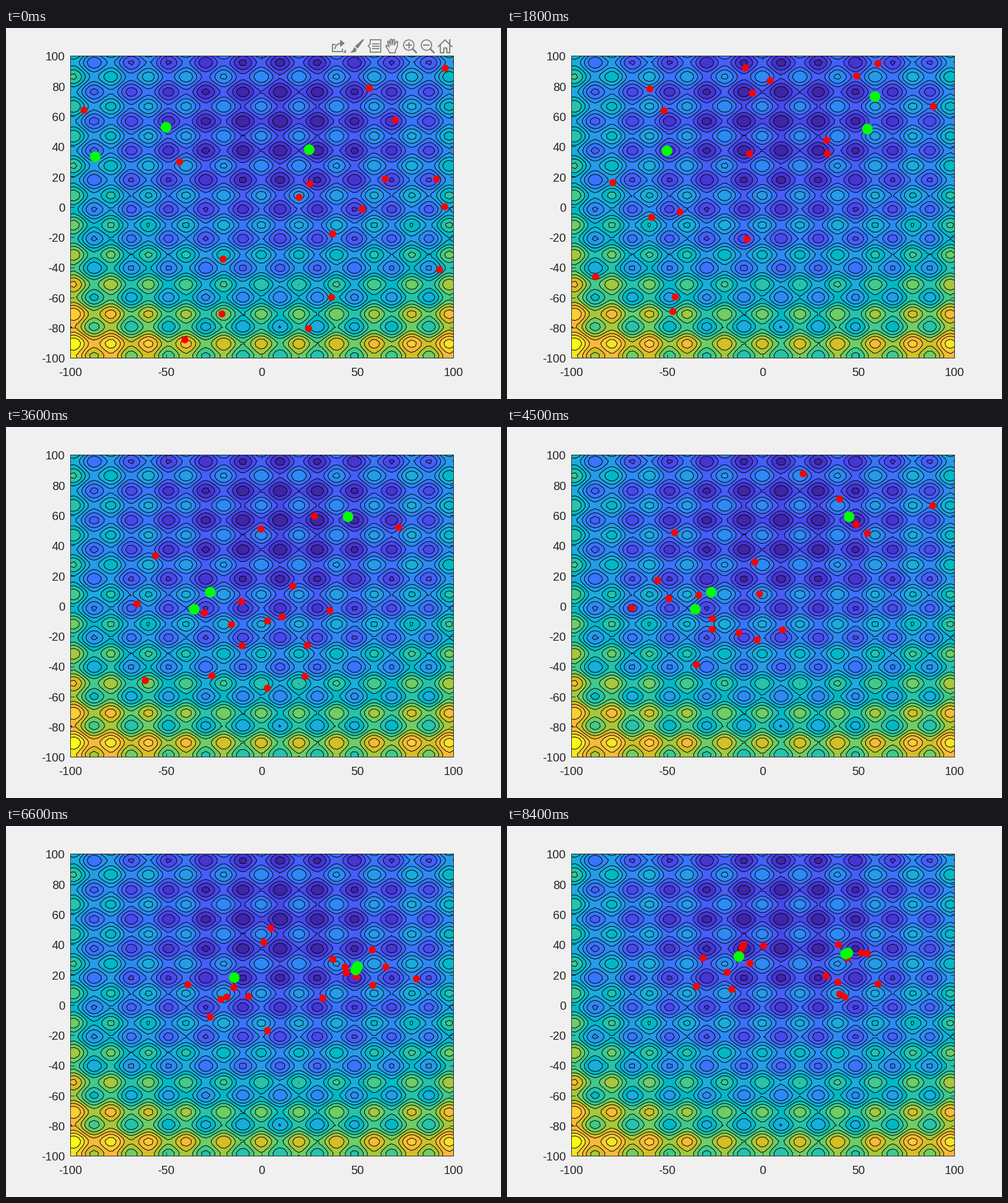
Write a matplotlib script that moves like this. It is 840 px wide and 630 px high and loops after 8.7 s.

```python
import numpy as np
import matplotlib.pyplot as plt
from matplotlib.animation import FuncAnimation
from matplotlib.patches import Circle, Polygon

W, H, DPI = 840, 630, 100
PX = 72 / DPI                      # one pixel in points
STEPS, STEP_MS = 29, 300
INK, GREY = "#262626", "#808080"

# Axes rectangle in pixels, y down
LEFT, WIDTH, TOP, HEIGHT = 109.4, 650, 47.4, 513

BANDS = ["#3e26a8", "#4535d2", "#4849ed", "#465efb", "#3974fe", "#2d8af5",
         "#259ce7", "#19addc", "#01b9c6", "#27c2ac", "#40ca8d", "#6ecd66",
         "#a4c83e", "#d3bf27", "#f7ba3c", "#fdcd32", "#f5e526", "#f9fb15"]

plt.rcParams["font.family"] = "Liberation Sans"
fig = plt.figure(figsize=(W / DPI, H / DPI), dpi=DPI, facecolor="#f0f0f0")


# ---- landscape: shifted Rastrigin function ----

def rastrigin(x, y, ox=9.45, oy=56.75):
    total = 0
    for d in (x - ox, y - oy):
        z = d * 5.12 / 100
        total = total + z**2 - 10 * np.cos(2 * np.pi * z) + 10
    return total


def draw_landscape():
    ax = fig.add_axes([LEFT / W, 1 - (TOP + HEIGHT) / H, WIDTH / W, HEIGHT / H])
    grid = np.linspace(-100, 100, 100)
    z = rastrigin(*np.meshgrid(grid, grid))
    levels = np.linspace(z.min(), z.max(), len(BANDS) + 1)
    edges = levels.copy()
    edges[0] -= 1
    edges[-1] += 1
    ax.contourf(grid, grid, z, levels=edges, colors=BANDS)
    ax.contour(grid, grid, z, levels=levels[1:-1], colors="black", linewidths=PX)
    ax.set(xlim=(-100, 100), ylim=(-100, 100),
           xticks=range(-100, 101, 50), yticks=range(-100, 101, 20))
    ax.tick_params(direction="in", top=True, right=True, length=6.5 * PX,
                   width=PX, color=INK, labelbottom=False, labelleft=False)
    for spine in ax.spines.values():
        spine.set(linewidth=PX, edgecolor=INK)
    return ax


field = draw_landscape()

# Overlay in pixel coordinates
top = fig.add_axes([0, 0, 1, 1], zorder=5)
top.set(xlim=(0, W), ylim=(H, 0))
top.axis("off")


def label(x, y, value, align):
    top.text(x, y, str(value), ha=align, va="baseline",
             fontsize=20 * PX, color=INK)


for v in range(-100, 101, 50):
    label(LEFT + (v + 100) / 200 * WIDTH - 0.6, 590.8, v, "center")
for v in range(-100, 101, 20):
    label(100, TOP + (100 - v) / 200 * HEIGHT + 8, v, "right")


# ---- toolbar ----

def stroke(*pts, width=2):
    return top.plot(*zip(*pts), color=GREY, lw=width * PX,
                    solid_joinstyle="round")[0]


def fill(*pts):
    return top.add_patch(Polygon(pts, fc=GREY, ec="none"))


def magnifier(x, plus):
    parts = [
        top.add_patch(Circle((x, 29), 8.8, fill=False, ec=GREY, lw=1.8 * PX)),
        stroke((x + 6.5, 35.5), (x + 12.5, 41.5), width=2.8),
        stroke((x - 4.5, 29), (x + 4.5, 29)),
    ]
    if plus:
        parts.append(stroke((x, 24.5), (x, 33.5)))
    return parts


toolbar = [
    # export
    stroke((558, 28), (554, 28), (554, 39.5), (571, 39.5), (571, 36)),
    stroke((558, 35), (560, 30), (564, 27), (569, 26)),
    fill((567, 19.5), (575, 26), (567, 32.5)),
    fill((577, 35.5), (577, 41.5), (571.5, 41.5)),
    # brush
    fill((606, 18.5), (607.5, 20), (597, 35), (592, 31)),
    fill((591, 32.5), (595.5, 36.5), (593, 41), (584, 42), (588, 38)),
    # data tip
    stroke((618, 20), (636, 20), (636, 41), (618, 41), (618, 34),
           (614.5, 30.5), (618, 27), (618, 20), width=1.8),
    *[stroke((622, y), (633, y), width=1.8) for y in (26.5, 30.5, 34.5)],
    # hand
    stroke((651, 42), (648, 36), (644.5, 31), (646, 29), (650, 32),
           (647.5, 23), (649.5, 22), (652.5, 29), (652, 19.5), (654.5, 19),
           (655.5, 28.5), (657, 19.5), (659.5, 20), (659, 29), (662.5, 22.5),
           (665, 23.5), (663.5, 33), (661, 38), (660.5, 42), (651, 42),
           width=1.8),
    *magnifier(683.5, True),
    *magnifier(713.5, False),
    # home
    stroke((733.5, 31.5), (745, 20), (756.5, 31.5)),
    stroke((737, 29), (737, 41.5), (742.5, 41.5), (742.5, 34), (747.5, 34),
           (747.5, 41.5), (753, 41.5), (753, 29)),
    stroke((752.5, 20), (752.5, 26)),
]


# ---- search: a pack scatters around three leaders and closes in ----

# Each leader holds a place until it finds a better one: step -> (x, y)
TRACKS = [
    {0: (-50.3, 53), 4: (-50.3, 37.4), 8: (-35.4, -2), 18: (-18.6, 12.8),
     21: (-14.6, 18.3), 26: (-12.7, 32.5)},
    {0: (24.5, 38.2), 5: (54.3, 51.8), 9: (44.8, 59.4), 17: (48.8, 23.5),
     27: (43, 33.9)},
    {0: (-87.2, 33.5), 6: (58.3, 73.3), 10: (63, 76), 12: (-27.2, 9.3),
     20: (49.7, 25.7), 25: (44.2, 34.7)},
]
PACK = 18
FOLLOWS = np.resize([0, 1, 0, 2], PACK)


def leaders_at(step):
    return np.array([t[max(k for k in t if k <= step)] for t in TRACKS])


def wolves_at(step):
    rng = np.random.default_rng(100 + step)
    anywhere = rng.uniform(-96, 96, (PACK, 2))
    if step == 0:
        return anywhere
    spread = 70 * np.exp(-1.9 * step / (STEPS - 1))
    near = leaders_at(step)[FOLLOWS] + rng.normal(0, spread, (PACK, 2))
    return np.where(np.abs(near) < 97, near, anywhere)


def dots(color, size):
    return field.plot([], [], "o", color=color, ms=size * PX, mew=0,
                      zorder=4)[0]


wolf_dots = dots("#ff0000", 12)
leader_dots = dots("#00ff00", 18)


def update(step):
    leader_dots.set_data(*leaders_at(step).T)
    wolf_dots.set_data(*wolves_at(step).T)
    for part in toolbar:
        part.set_visible(step == 0)
    return [wolf_dots, leader_dots, *toolbar]


anim = FuncAnimation(fig, update, frames=STEPS, interval=STEP_MS,
                     repeat=True, repeat_delay=0, blit=False)
plt.show()
```
